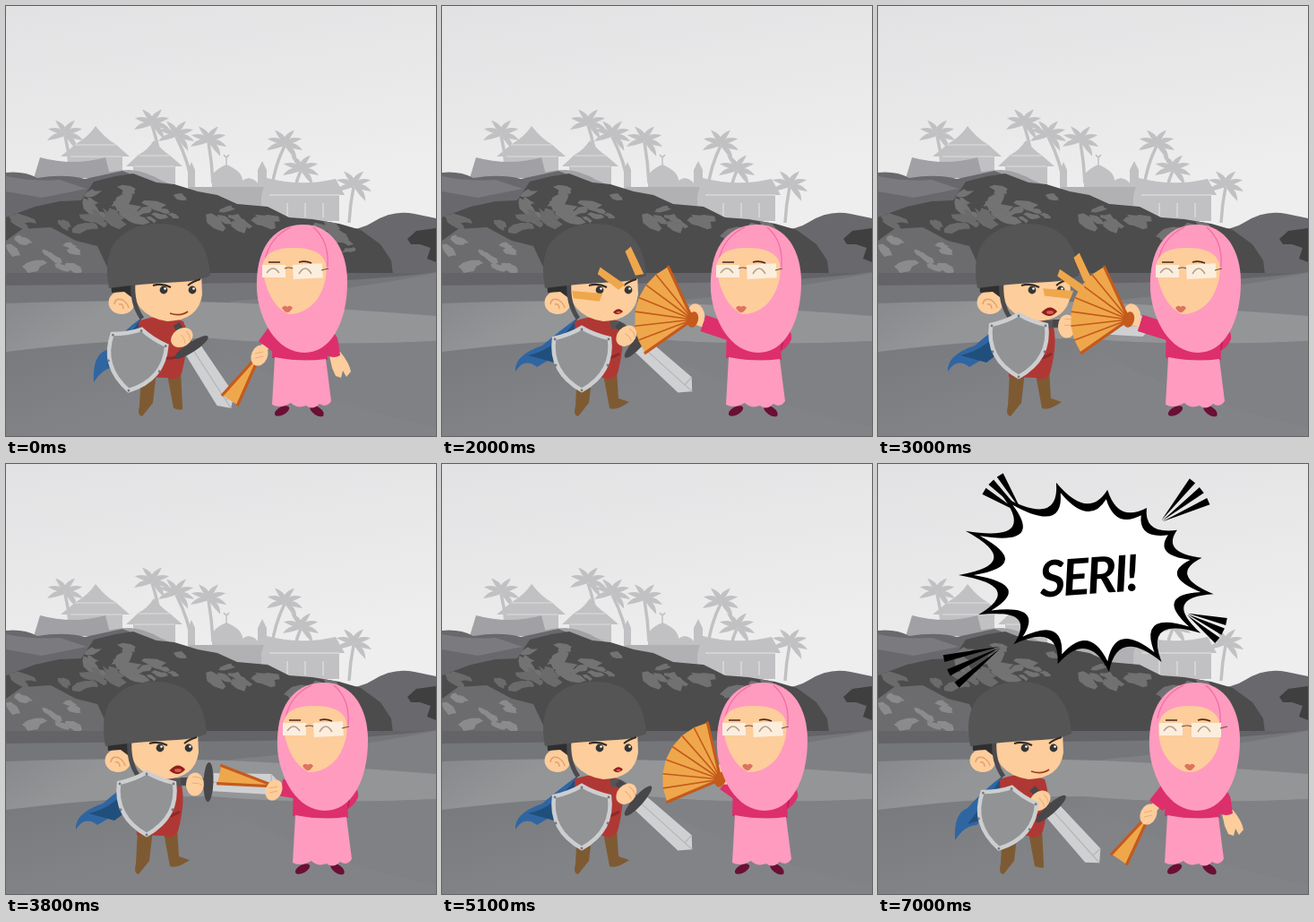
An HTML page with a canvas that plays this animation: 480x480 px, repeating every 7.2 s.

```html
<!DOCTYPE html>
<html lang="ms">
<head>
<meta charset="utf-8">
<style>
html, body { margin: 0; height: 100%; overflow: hidden; background: #7e7f83; }
canvas { display: block; width: 100vw; height: 100vh; }
</style>
</head>
<body>
<canvas id="stage" width="480" height="480"></canvas>
<script>
const stage = document.getElementById('stage').getContext('2d');
const back = document.createElement('canvas');
back.width = back.height = 480;
let g = back.getContext('2d');

const LOOP = 7200, FINALE = 5600, RAD = Math.PI / 180;
const SKIN = '#fdcd9b', CREASE = '#e9ae78', PINK = '#ff9bbf', ROSE = '#dd2f6b', RED = '#b03834';
const STEEL = '#555556', ORANGE = '#efa74c', RUST = '#c45a1c', BOOT = '#7e5a33', FAR = '#c1c1c3';

// ---- drawing helpers ----
function fill(color, d) {
  g.fillStyle = color;
  g.fill(new Path2D(d));
}
function line(color, width, d) {
  g.strokeStyle = color;
  g.lineWidth = width;
  g.stroke(new Path2D(d));
}
function disc(color, x, y, rx, ry = rx, turn = 0) {
  g.fillStyle = color;
  g.beginPath();
  g.ellipse(x, y, rx, ry, turn * RAD, 0, 7);
  g.fill();
}
function at(x, y, turn, draw) {
  g.save();
  g.translate(x, y);
  g.rotate(turn * RAD);
  draw();
  g.restore();
}
function shade(y0, y1, top, bottom) {
  const s = g.createLinearGradient(0, y0, 40, y1);
  s.addColorStop(0, top);
  s.addColorStop(1, bottom);
  return s;
}
const polar = (turn, r) => `${r * Math.cos(turn * RAD)} ${r * Math.sin(turn * RAD)}`;

// ---- timing helpers ----
function ramp(t, from, to) {
  const u = Math.min(1, Math.max(0, (t - from) / (to - from)));
  return u * u * (3 - 2 * u);
}
const bump = (t, peak) => ramp(t, peak - 400, peak) - ramp(t, peak, peak + 400);

// ---- landscape ----
let seed = 11;
const rnd = () => (seed = seed * 16807 % 2147483647) / 2147483647;

function palm(x, y, lean, height) {
  line(FAR, 3.5, `M${x} ${y}q${lean * .8} ${height / 2} ${lean} ${height}`);
  for (let turn = -180; turn <= 36; turn += 36)
    at(x, y, turn, () => {
      const bend = turn > -90 ? 1 : -1;
      fill(FAR, `M0 0Q10 ${-8 * bend} 20 ${5 * bend}Q11 ${4 * bend} 0 0Z`);
    });
}

function patches(count, color, x, y, w, h, slope) {
  for (let n = 0; n < count; n++) {
    const u = rnd(), size = 6 + rnd() * 13;
    at(x + u * w, y + u * slope + rnd() * h, rnd() * 60 - 15, () => {
      let d = 'M';
      for (let k = 0; k < 9; k++) {
        const r = size * (.45 + rnd() * .7), a = k * 40 * RAD;
        d += `${k ? 'L' : ''}${r * Math.cos(a)} ${r * .42 * Math.sin(a)}`;
      }
      fill(color, d + 'Z');
    });
  }
}

function landscape() {
  g.fillStyle = shade(0, 250, '#e2e2e4', '#eeeeee');
  g.fillRect(0, 0, 480, 480);

  // village
  palm(66, 145, 5, 33);
  palm(163, 133, 10, 48);
  palm(190, 146, 18, 56);
  palm(226, 152, 5, 46);
  palm(311, 156, -14, 46);
  palm(329, 184, -6, 20);
  palm(388, 202, -5, 40);
  fill(FAR, 'M100 134Q111 148 122 154L138 168H130V190H70V168H61L78 154Q92 146 100 134Z');
  fill(FAR, 'M165 150Q175 162 182 166L197 179H189V206H142V179H134L148 166Q158 161 165 150Z');
  line('#dededf', 1.2, 'M77 155H123M72 168H129M148 167H183M143 179H188');
  fill('#a1a1a5', 'M38 169Q75 179 111 169L117 192H31Z');
  fill('#a1a1a5', 'M98 193Q112 183 138 183Q155 184 172 194L205 208H100Z');
  fill(FAR, 'M203 210V183L207 174L211 183V210ZM281 212V183L286 173L291 183V212Z');
  fill(FAR, 'M230 206V194Q229 184 246 177Q263 184 264 194V206ZM259 206Q259 194 271 192Q283 194 283 206Z');
  line(FAR, 1.5, 'M246 180V169M243 166Q246 171 249 166');
  fill('#b1b1b4', 'M205 202H290L295 232H200Z');
  fill(FAR, 'M291 192Q330 202 368 193L378 211H372V240H285V211Z');
  line('#dcdcde', 1.4, 'M294 211H372M314 220V236M334 220V236M354 220V236');

  // hills
  fill('#69686c', 'M0 186Q20 184 35 192Q65 187 88 193L130 184L160 196V300H0Z');
  fill('#7b7a7e', 'M0 190Q30 196 60 194L90 204L40 214L0 207Z');
  fill('#69686c', 'M370 250Q395 251 410 241Q432 227 456 232L480 237V302H300Z');
  g.save();
  const rock = 'M0 236L32 224L60 218L84 217L98 196L122 190L142 187L168 197L188 199L214 207L236 211L258 221L292 224L316 236L342 238L372 243L396 250L418 266L430 284L432 300H0Z';
  fill('#4c4c4c', rock);
  g.clip(new Path2D(rock));
  patches(16, '#737374', 95, 198, 110, 36, 10);
  patches(11, '#6b6b6c', 5, 230, 120, 22, 0);
  patches(20, '#717172', 185, 206, 220, 30, 44);
  fill('#6c6c6e', 'M0 262L18 249L50 247L78 262L102 268L116 298H0Z');
  patches(11, '#8b8b8d', 5, 258, 95, 34, 8);
  g.restore();
  fill('#3f3f40', 'M448 260L458 251L480 248V286L470 282L474 270L462 266L452 266Z');

  // ground
  g.fillStyle = '#646468';
  g.fillRect(0, 298, 480, 182);
  fill('#75767a', 'M0 312L280 309Q400 308 480 297V350H0Z');
  fill('#7f8083', 'M250 330Q380 318 480 298V350H250Z');
  fill(shade(320, 385, '#85878a', '#939597'), 'M0 332Q160 326 290 333Q390 339 480 346V390H0Z');
  fill(shade(360, 480, '#77787c', '#828387'), 'M0 386Q120 371 230 371Q350 382 480 374V480H0Z');
  fill('#808185', 'M225 372Q350 380 480 374V470Q330 440 225 372Z');
}

// ---- speech burst ----
function burst(color, scale) {
  const spot = (turn, r) => `${138 * r * Math.cos(turn * RAD)} ${105 * r * Math.sin(turn * RAD)}`;
  const reach = turn => scale * (1 + .1 * Math.cos((turn - 40) * 2 * RAD) + .1 * Math.cos((turn - 156) * RAD));
  let d = 'M' + spot(12, reach(12));
  for (let turn = 36; turn <= 372; turn += 24)
    d += `Q${spot(turn - 12, scale * .58)} ${spot(turn, reach(turn))}`;
  fill(color, d + 'Z');
}

function rays(x, y, turn, length) {
  for (let k = -1; k <= 1; k++)
    at(x, y, turn + 14 * k, () => fill('#000', `M4 0L${length} -4V4Z`));
}

function shout() {
  rays(163, 57, 225, 52);
  rays(314, 66, 322, 60);
  rays(140, 203, 154, 68);
  rays(342, 166, 26, 48);
  at(243, 124, 0, () => {
    burst('#000', 1);
    burst('#fff', .89);
  });
  at(234, 126, -4, () => {
    g.fillStyle = '#000';
    g.font = 'italic 700 56px Lato, "Open Sans", sans-serif';
    g.letterSpacing = '-3px';
    g.textAlign = 'center';
    g.textBaseline = 'middle';
    g.fillText('SERI!', 0, 2);
  });
}

// ---- knight ----
function sword(x, y, turn) {
  at(x, y, turn, () => {
    fill('#cfd0d2', 'M2 -10L70 -11.5L81 0L70 11.5L2 10Z');
    line('#b4b5b7', 1.2, 'M4 0H70L81 0M70 0V-11');
    line('#47474a', 8, 'M-31 0H-4');
    disc('#47474a', 0, 0, 5.5, 22);
    disc(SKIN, -15, 3, 10, 13);
    line(CREASE, 1, 'M-18 -5Q-10 -6 -7 -2M-18 2Q-10 1 -7 4');
  });
}

function shield(x, y, turn) {
  at(x, y, turn, () => {
    const d = 'M0 -36Q13 -28 31 -24Q36 14 0 34Q-36 14 -31 -24Q-13 -28 0 -36Z';
    fill('#929395', d);
    line('#cdced0', 4.5, d);
    for (const side of [-1, 1]) {
      disc('#77787a', 30 * side, -23, 1.4);
      disc('#77787a', 29 * side, 6, 1.4);
      disc('#77787a', 0, 34 * side, 1.4);
    }
  });
}

function knightHead(wide, thrust) {
  disc(SKIN, 129, 331, 14.5, 13);
  line('#e0a270', 1.5, 'M121 333Q122 325 130 328Q136 332 137 337M126 333Q131 332 131 338');
  fill('#2f2f30', 'M117 308H140V325L132 319L118 320Z');
  fill(SKIN, 'M139 303Q140 346 180 352Q215 351 219 322L218 298Z');
  line('#4b4b4d', 5, 'M142 308Q140 332 152 349');
  fill(STEEL, 'M115 315Q109 285 120 266Q137 243 170 243Q203 243 217 264Q227 278 228 301Q215 307 195 308Q150 310 115 315Z');
  for (const x of [176, 208]) {
    disc('#353536', x, 317, 4.4);
    disc('#fff', x + 1.5, 315.5, 1.3);
  }
  line('#3a2a22', 2, 'M164 312Q174 309 184 314M203 312Q209 307 217 305');
  if (wide < .3) line('#9c4020', 1.7, 'M183 343Q195 347 203 341');
  else at(197 - thrust, 341, 0, () => {
    const s = 1 + .6 * thrust;
    fill('#8a211c', `M${-6 * s} 1Q0 ${-6 * s} ${5 * s} 0Q0 ${6 * s} ${-6 * s} 1Z`);
    disc('#e0574a', 0, 1, 2.5 * s, 1.2 * s);
  });
}

function knight(t) {
  const front = t >= FINALE ? 1 : 0;
  const wide = front ? 0 : ramp(t, 100, 800);
  const thrust = ramp(t, 2000, 2400) - ramp(t, 4600, 5000);
  const dx = -12 * front - 4 * thrust;
  at(dx, 0, 0, () => {
    const tip = 98 - 16 * wide, hem = 420 - 12 * wide;
    fill('#2f66a2', `M150 349Q132 362 112 ${384 - 5 * wide}Q${tip - 2} 390 ${tip} ${hem}Q${tip + 10} ${hem - 16} ${tip + 24} 403L158 372Z`);
    fill('#214f7c', `M150 350L156 375L125 398L${tip + 14} ${hem - 18}Q126 384 150 350Z`);
    fill(BOOT, 'M151 408H168L164 443L152 458Q146 457 149 446Z');
    fill(BOOT, `M179 406H195L197 ${448 - 10 * wide}L${197 + 12 * wide} ${450 - 8 * wide}Q195 452 187 449Z`);
    fill(RED, 'M148 352Q172 342 198 352Q206 372 196 410Q190 420 180 415L150 414Z');
    line('#8c2a2a', 3, 'M170 392Q186 396 198 388');
    knightHead(wide, thrust);
  });
  const x = 207 + 12 * wide + 7 * thrust - 14 * front;
  const y = 381 - 5 * wide - 21 * thrust + 4 * front;
  const turn = 57 - 15 * wide - 40 * thrust - 9 * front;
  const hx = x - 16 * Math.cos(turn * RAD), hy = y - 16 * Math.sin(turn * RAD);
  line(wide > .5 ? STEEL : RED, 9, `M${188 + dx} 356Q${(190 + dx + hx) / 2 + 3} 354 ${hx} ${hy}`);
  sword(x, y, turn);
  shield(144 + 12 * wide + thrust - 2 * front, 396 - wide - 15 * thrust, 12 * (1 - wide));
}

// ---- lady ----
function fan(x, y, turn, half) {
  at(x, y, turn, () => {
    const r = 65, folds = half > 15 ? 7 : 1;
    let sheet = 'M0 0', ribs = '';
    for (let k = 0; k <= folds; k++) {
      const rib = polar(half * (2 * k / folds - 1), r);
      sheet += 'L' + rib;
      ribs += 'M0 0L' + rib;
    }
    fill(ORANGE, sheet + 'Z');
    line(RUST, 1.6, ribs);
    line(RUST, 3.2, `M0 0L${polar(-half, r + 1)}M0 0L${polar(half, r + 1)}`);
    disc(RUST, 0, 0, folds > 1 ? 6 : 3, folds > 1 ? 9 : 3);
  });
}

function hand(x, y, tilt) {
  disc(SKIN, x, y, 9, 12, tilt);
  if (tilt > 0) line(CREASE, 1, `M${x - 5} ${y - 2}l9 -2m-9 7l9 -2`);
}

function face(front) {
  fill(SKIN, front
    ? 'M290 291Q294 270 325 270Q355 270 359 291Q361 323 341 338Q325 350 309 338Q289 323 290 291Z'
    : 'M286 292Q288 269 322 270Q351 270 357 287Q360 308 347 328Q334 344 315 344Q292 333 286 292Z');
  const left = front ? 291 : 286, right = front ? 327 : 320;
  line('#4a2a20', 1.7, `M${left + 7} 286h13M${right + 7} 286q7 -2 14 1`);
  g.fillStyle = '#fceedd';
  g.fillRect(left, 289, 26, 14);
  at(right, 289, front ? 0 : -3, () => g.fillRect(0, 0, 33, 16));
  line('#6b5146', 1.2, `M${left + 25} 293Q${right - 4} 291 ${right} 293M${right + 32} 295l8 -2`);
  line('#b79f8b', 1.5, `M${left + 5} 298q7 -10 14 0M${right + 7} 299q7 -12 14 0`);
  at(front ? 325 : 314, 337, 0, () => fill('#dd7360', 'M-6 0Q-3 -4 0 -1Q3 -4 6 0Q2 6 0 5Q-3 5 -6 0Z'));
}

function lady(t) {
  const front = t >= FINALE;
  const lift = ramp(t, 100, 1100), jab = bump(t, 2000), swipe = bump(t, 3000), hit = jab + swipe;
  const open = front
    ? ramp(t, 5600, 6000) - ramp(t, 6600, 7000)
    : ramp(t, 600, 1200) - ramp(t, 3400, 3800) + ramp(t, 4400, 5100);
  const dx = front ? 23 : 23 * lift + 4 * open - 7 * jab - 3 * swipe;
  const x = front ? 305 + 44 * open : 285 + 16 * lift + 10 * open - 31 * hit;
  const y = front ? 388 - 14 * open : 386 - 26 * lift - 8 * open - 2 * hit;
  const turn = front ? 124 + 179 * open : 123 + 69 * lift + 15 * open - 12 * hit;
  const spread = 9 + 41 * open;
  const behind = !front && spread > 25;

  at(dx, 0, 0, () => {
    disc('#6a0f35', 308, 452, 9, 4.5, -28);
    disc('#6a0f35', 347, 452, 9, 4.5, 35);
    if (front || lift < .2) {
      fill(SKIN, 'M360 386L373 386Q383 398 385 408L380 414L376 407L374 415L368 413L364 404Z');
      fill(ROSE, 'M350 358Q370 362 371 376L373 390Q366 394 358 390Z');
    } else {
      fill(ROSE, 'M352 356Q372 358 370 372Q366 382 354 388Z');
      line('#b51f55', 1.5, 'M357 386Q362 376 359 370');
    }
    fill(ROSE, 'M298 358H357L359 395Q330 397 297 393Z');
    fill(PINK, 'M300 392Q330 398 357 394L363 441Q358 449 350 444Q342 452 335 446Q325 450 318 443Q306 450 297 445Z');
  });

  // the sleeve bends at the elbow when the fan covers the face
  const sx = 301 + dx, sy = 364, elbow = front ? 16 * open : 0;
  const ex = sx + (x - sx) * .72, ey = sy + (y - sy) * .72 + elbow / 2;
  line(ROSE, 19, `M${sx + 8} ${sy - 6}L${sx - elbow / 2} ${sy + elbow / 2}L${ex} ${ey}`);
  line(SKIN, 9, `M${ex} ${ey}L${x} ${y}`);
  if (behind) hand(x + 4, y - 6, -15);
  if (!front) fan(x, y, turn, spread);
  if (!front && !behind) hand(x - 2, y + 4, 25);

  at(dx, 0, 0, () => {
    fill(PINK, 'M330 244C364 243 381 273 381 308C381 354 362 387 333 387C302 387 282 350 280 317C278 274 296 245 330 244Z');
    line('#f06ba3', 1.2, 'M318 247Q294 258 289 284M343 247Q361 262 359 291');
    face(front);
  });
  if (front) {
    fan(x, y, turn, spread);
    hand(x - 3, y + 3, 25);
  }
}

// splinters fly from the fan, each one steeper and slower than the last
function splinters(p) {
  for (let k = 0; k < 3; k++)
    at(218 + 8 * k - (56 - 18 * k) * p, 320 - 12 * k + (4 - 7 * k) * p, 3 + 30 * k, () =>
      fill(ORANGE, 'M-17 -5L17 -4L14 5L-15 3Z'));
}

// ---- timeline ----
function beat(t) {
  const quick = t >= 2500 && t < 3200 || t >= 5000 && t < 5600;
  return t - t % (quick ? 100 : 200);
}

function draw(now) {
  const t = beat(now % LOOP);
  g.drawImage(back, 0, 0);
  if (t >= FINALE) shout();
  knight(t);
  lady(t);
  if (t >= 1800 && t < 2200) splinters(t < 2000 ? .4 : 1);
  if (t >= 2900 && t < 3300) splinters((t - 2900) / 330);
  requestAnimationFrame(tick);
}

const start = performance.now();
const tick = () => draw(performance.now() - start);

landscape();
g = stage;
tick();
</script>
</body>
</html>
```
